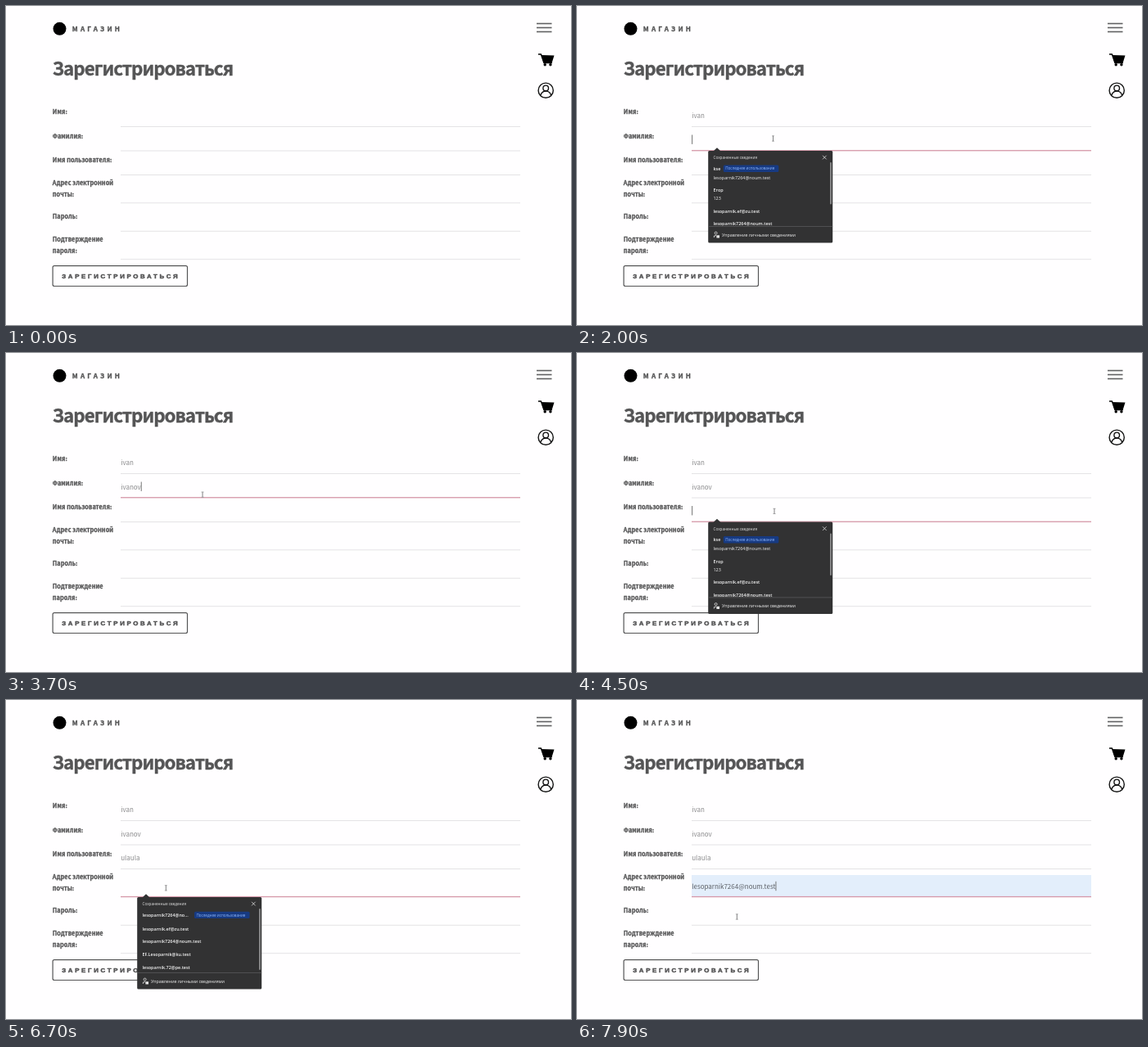
Recreate the animation shown at these times as an HTML page with a canvas. Size 690 by 390 pixels, loop 8000 ms.

```html
<!DOCTYPE html>
<html lang="ru">
<head>
<meta charset="utf-8">
<title>Регистрация</title>
<style>
  html, body { margin: 0; width: 100%; height: 100%; overflow: hidden; background: #fffeff; }
  canvas { display: block; }
</style>
</head>
<body>
<canvas id="stage" width="690" height="390"></canvas>
<script>
const ctx = document.getElementById('stage').getContext('2d');
const LOOP = 8000;
const INK = '#555556';
const FORM = '"Noto Sans CJK JP", "Noto Sans CJK SC", "Noto Sans CJK", "Open Sans", sans-serif';
const MENU = '"Open Sans", "Noto Sans", sans-serif';
const ARIAL = '"Liberation Sans", Arial, sans-serif';
const MAIL = 'lesoparnik7264@noum.test';

const labels = [
  ['Имя:', 132.2], ['Фамилия:', 161.9], ['Имя пользователя:', 191.4],
  ['Адрес электронной', 219.2], ['почты:', 233], ['Пароль:', 260.4],
  ['Подтверждение', 288], ['пароля:', 301.9]
];
const lines = [147.5, 177, 206.5, 240.8, 275.3, 309.7];

// keys: time and the text in the field from then on
const fields = [
  { focus: 100, blur: 1900, base: 136.9, caret: 100,
    keys: [[700, 'i'], [800, 'iv'], [900, 'iva'], [1100, 'ivan']] },
  { focus: 1900, blur: 4500, base: 166.5, caret: 2000,
    keys: [[2500, 'i'], [2600, 'iv'], [2650, 'iva'], [2700, 'ivan'], [3500, 'ivano'], [3700, 'ivanov']] },
  { focus: 4500, blur: 6700, base: 196, caret: 4500,
    keys: [[5200, 'u'], [5300, 'ul'], [5500, 'ula'], [5800, 'ulau'], [5900, 'ulaul'], [6100, 'ulaula']] },
  { focus: 6700, blur: LOOP, base: 230.8, caret: 6800, keys: [[7700, MAIL]] }
];
const menus = [[1900, 2500, 177], [4500, 5200, 206.5], [6700, 7700, 241]];
const HOVER = 7100;

// pointer: time, x, y
const path = [
  [100, 217.5, 136.5], [800, 217.5, 136.5], [1300, 239.5, 162],
  [3500, 239.5, 162], [4000, 241, 193.3], [6300, 241, 193.3],
  [6650, 195.3, 228], [6900, 195.3, 245], [7700, 195.3, 262], [7900, 195.3, 265]
];

function rect(x, y, w, h, color) {
  ctx.fillStyle = color;
  ctx.fillRect(x, y, w, h);
}

function round(x, y, w, h, r, color) {
  ctx.beginPath();
  ctx.roundRect(x, y, w, h, r);
  ctx.fillStyle = color;
  ctx.fill();
}

function shape(points, color) {
  ctx.beginPath();
  points.forEach(p => ctx.lineTo(p[0], p[1]));
  ctx.fillStyle = color;
  ctx.fill();
}

function stroke(points, width, color) {
  ctx.beginPath();
  points.forEach((p, i) => i ? ctx.lineTo(p[0], p[1]) : ctx.moveTo(p[0], p[1]));
  ctx.lineWidth = width;
  ctx.strokeStyle = color;
  ctx.stroke();
}

function circle(x, y, r, color, width) {
  ctx.beginPath();
  ctx.arc(x, y, r, 0, 7);
  ctx.lineWidth = width || 1;
  ctx.fillStyle = ctx.strokeStyle = color;
  if (width) ctx.stroke(); else ctx.fill();
}

function text(str, x, y, size, weight, family, color, spacing = 0) {
  ctx.font = `${weight} ${size}px ${family}`;
  ctx.letterSpacing = spacing + 'px';
  ctx.fillStyle = color;
  ctx.fillText(str, x, y);
  return ctx.measureText(str).width;
}

// bold text thickened by a thin outline
function heavy(str, x, y, size, family, spacing, extra) {
  text(str, x, y, size, 700, family, INK, spacing);
  ctx.lineWidth = extra;
  ctx.lineJoin = 'round';
  ctx.strokeStyle = INK;
  ctx.strokeText(str, x, y);
}

function header() {
  circle(65.5, 27.8, 8, '#000');
  heavy('МАГАЗИН', 80.8, 31, 8.1, FORM, 3.2, 0.35);
  for (const y of [20.7, 25.7, 30.7]) rect(648, y, 18.5, 1.6, '#606062');

  stroke([[650, 58.9], [653.4, 58.9], [657, 69.4], [667, 69.4]], 1.5, '#000');
  shape([[653.6, 60], [669.5, 60.6], [666.8, 69], [656.5, 69.4]], '#000');
  circle(658.2, 71.8, 1.7, '#000');
  circle(664.9, 71.8, 1.7, '#000');

  circle(659.2, 103.2, 9.1, '#111', 1.4);
  circle(659.2, 100.4, 3.3, '#111', 1.4);
  ctx.beginPath();
  ctx.arc(659.2, 110.4, 6.4, Math.PI * 1.06, Math.PI * 1.94);
  ctx.stroke();
}

function page() {
  rect(0, 0, 690, 390, '#fffeff');
  header();
  heavy('Зарегистрироваться', 56.8, 85.4, 22.4, FORM, -1, 0.4);
  for (const [str, y] of labels) heavy(str, 56.8, y, 7.3, FORM, 0.07, 0.3);
  ctx.beginPath();
  ctx.roundRect(57.1, 317.6, 164.4, 24.9, 2);
  ctx.lineWidth = 1.2;
  ctx.strokeStyle = INK;
  ctx.stroke();
  heavy('ЗАРЕГИСТРИРОВАТЬСЯ', 68.2, 332.8, 7.9, ARIAL, 2.67, 0.5);
}

function drawFields(t) {
  if (t >= HOVER) rect(140, 214, 488, 26.5, '#e3eefb');
  lines.forEach((y, i) => {
    const f = fields[i];
    const on = f && t >= f.focus && t < f.blur;
    if (on) rect(140, y - 0.9, 488, 1.3, '#d597a8');
    else rect(140, y - 0.5, 488, 1, '#e4e3e5');
    if (!f) return;

    const key = f.keys.filter(k => k[0] <= t).pop();
    const value = key ? key[1] : '';
    const ink = value === MAIL ? '#5c6067' : '#8a8a8c';
    const w = text(value, 140.2, f.base, 8, 300, FORM, ink);
    const since = t - (key ? key[0] : f.caret);
    if (on && since >= 0 && since % 1000 < 500)
      rect(140.2 + w, f.base - 9, 0.9, 11.4, '#666');
  });
  if (t >= HOVER && t < 7700) text(MAIL, 140.2, 231, 6.5, 400, ARIAL, '#111');
}

function badge(x, y) {
  round(x, y - 4.2, 67.5, 8.4, 1.5, '#173a82');
  text('Последнее использование', x + 2.4, y + 1.7, 4.6, 400, MENU, '#8fb8ff');
}

function menu(top, mails, hover) {
  const bg = '#323233', white = '#f4f4f4';
  const item = (str, y, weight = 600) => text(str, 166.5, y + 2, 5.45, weight, MENU, white);
  ctx.save();
  ctx.translate(0, top);
  shape([[166.5, 0.5], [171, -3.8], [175.5, 0.5]], bg);
  round(160.2, 0, 152, 112.6, 1.5, bg);
  text('Сохраненные сведения', 166.5, 10.1, 4.65, 400, MENU, '#e2e2e2');
  stroke([[300, 5.8], [304.6, 10.4]], 0.8, '#ddd');
  stroke([[304.6, 5.8], [300, 10.4]], 0.8, '#ddd');

  ctx.save();
  ctx.beginPath();
  ctx.rect(160, 12, 152, 79.5);
  ctx.clip();
  if (mails) {
    if (hover) round(162.5, 13.5, 143.5, 17, 1.5, '#4b4b4c');
    item(MAIL.slice(0, 17) + '...', 21.8);
    badge(230, 21.9);
    item('lesoparnik.ef@zu.test', 39);
    item(MAIL, 54.4);
    item('EF.Lesoparnik@ku.test', 70);
    item('lesoparnik.72@pe.test', 85.5);
  } else {
    item('kse', 21.5);
    badge(178.8, 21.7);
    item(MAIL, 32.8, 400);
    item('Егор', 48.2);
    item('123', 58, 400);
    item('lesoparnik.ef@zu.test', 73.5);
    item(MAIL, 89.3);
  }
  ctx.restore();
  round(309, 14, 1.8, mails ? 75 : 51.5, 0.9, '#8b8b8c');

  rect(160.2, 92, 152, 0.8, '#58585a');
  circle(169.6, 100.6, 1.5, '#e8e8e8', 0.8);
  stroke([[167.3, 106], [167.5, 104], [170, 103.6]], 0.8, '#e8e8e8');
  rect(170.4, 103.3, 3.6, 3.2, '#e8e8e8');
  text('Управление личными сведениями', 177, 104.8, 5.3, 400, MENU, '#f0f0f0');
  ctx.restore();
}

function pointer(t) {
  if (t < 100 || (t >= 6900 && t < 7700)) return;
  let i = 0;
  while (i < path.length - 2 && t >= path[i + 1][0]) i++;
  const [t0, x0, y0] = path[i], [t1, x1, y1] = path[i + 1];
  const p = Math.min(1, (t - t0) / (t1 - t0));
  const e = p * p * (3 - 2 * p);
  const x = x0 + (x1 - x0) * e, y = y0 + (y1 - y0) * e;
  rect(x - 0.45, y - 3.3, 0.9, 6.6, '#747476');
  rect(x - 1.5, y - 3.5, 3, 0.8, '#949496');
  rect(x - 1.5, y + 2.7, 3, 0.8, '#949496');
}

function frame(now) {
  const t = now % LOOP;
  page();
  drawFields(t);
  pointer(t);
  for (const [from, to, top] of menus)
    if (t >= from && t < to) menu(top, top === 241, t >= HOVER);
  requestAnimationFrame(frame);
}
requestAnimationFrame(frame);
</script>
</body>
</html>
```
